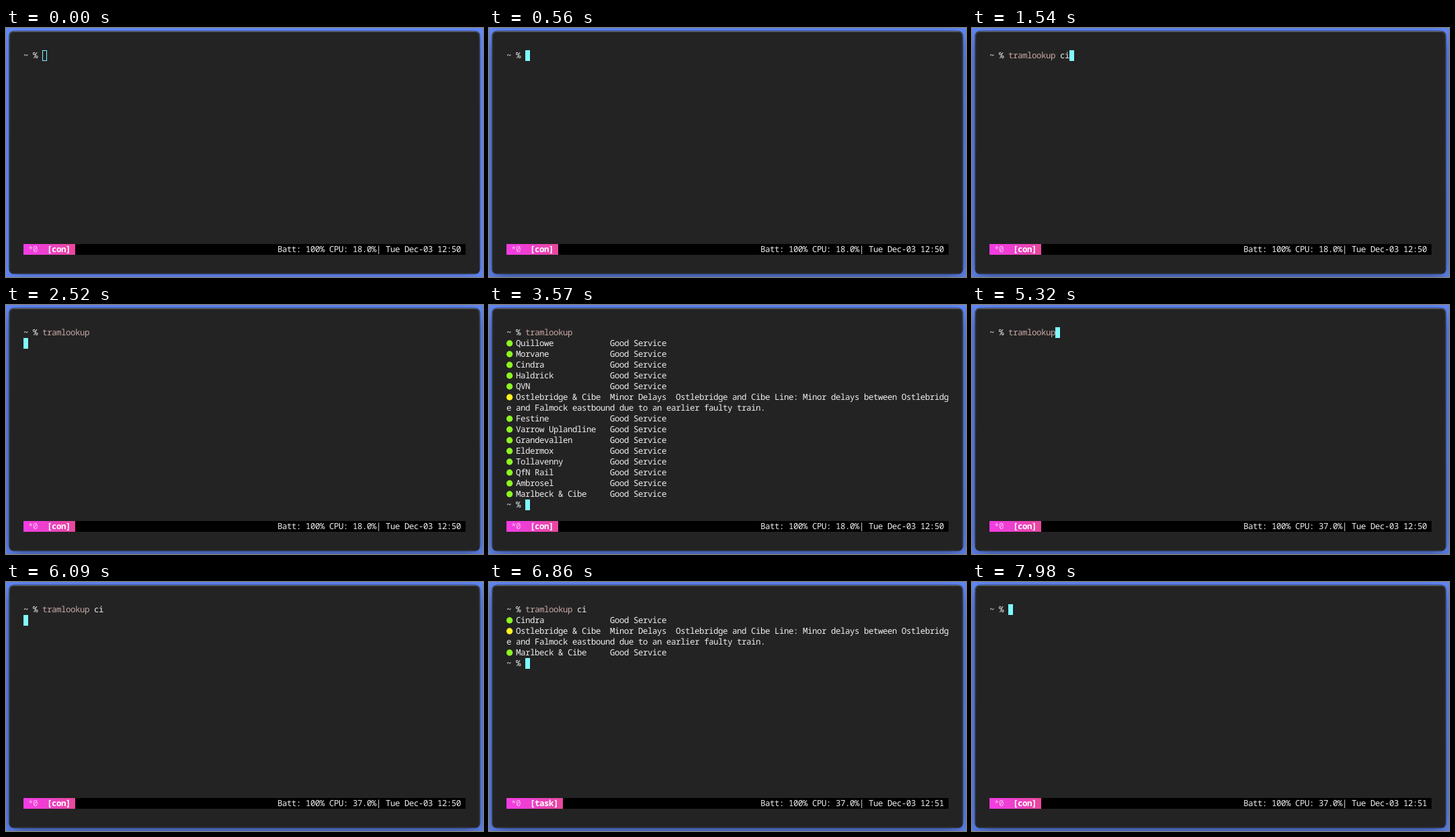
Recreate the animation shown at these times as an HTML page. Size 710x370 px, loop 8 s.

```html
<!DOCTYPE html>
<html lang="en">
<head>
<meta charset="utf-8">
<title>Terminal</title>
<style>
  html, body { margin: 0; width: 100%; height: 100%; overflow: hidden; background: #648bfb; }
  svg { display: block; }
  text {
    font-family: "Noto Sans Mono", "DejaVu Sans Mono", monospace;
    font-size: 12.5px;
    letter-spacing: -0.5px;
    white-space: pre;
    text-rendering: geometricPrecision;
  }
</style>
</head>
<body>
<svg width="710" height="370" viewBox="0 0 710 370">
  <defs>
    <filter id="blur" x="-20%" y="-20%" width="140%" height="140%">
      <feGaussianBlur stdDeviation="14"/>
    </filter>
    <linearGradient id="pink">
      <stop offset="0" stop-color="#f43ce4"/>
      <stop offset="0.4" stop-color="#ee3fd0"/>
      <stop offset="1" stop-color="#e8489c"/>
    </linearGradient>
    <linearGradient id="edge" x2="0" y2="1">
      <stop offset="0" stop-color="#6a6a6a"/>
      <stop offset="0.03" stop-color="#3c3c3c"/>
      <stop offset="1" stop-color="#333"/>
    </linearGradient>
  </defs>
  <rect width="710" height="370" fill="#648bfb"/>
  <rect id="shadow" x="5" y="13" width="700" height="360" rx="6" filter="url(#blur)"/>
  <rect x="4.5" y="4.5" width="701" height="361" rx="7" fill="#10131c"/>
  <rect x="5.5" y="5.5" width="699" height="359" rx="6" fill="#232323" stroke="url(#edge)"/>
  <g id="screen"></g>
</svg>
<script>
const LOOP = 8000, LEFT = 26, TOP = 33, CW = 7, LH = 16, COLS = 94, BAR = 18;
const WHITE = '#efefef', ROSE = '#c9a9a7', CYAN = '#80fbff', GREEN = '#8cf622', YELLOW = '#fff222';
const CMD = 'tramlookup', OK = 'Good Service';

const LINES = [
  'Quillowe', 'Morvane', 'Cindra', 'Haldrick', 'QVN', 'Ostlebridge & Cibe',
  'Festine', 'Varrow Uplandline', 'Grandevallen', 'Eldermox', 'Tollavenny',
  'QfN Rail', 'Ambrosel', 'Marlbeck & Cibe'
].map(name => ({ name, status: OK, note: '' }));
Object.assign(LINES[5], {
  status: 'Minor Delays',
  note: 'Ostlebridge and Cibe Line: Minor delays between Ostlebridge' +
        ' and Falmock eastbound due to an earlier faulty train.'
});

// Timelines: [start time, value]
const INPUT = [
  [0, ''], [1050, CMD + ' ci'], [1890, CMD], [3710, ''], [4410, CMD],
  [5460, CMD + ' '], [5530, CMD + ' c'], [5600, CMD + ' ci'], [7280, '']
];
const PHASE = [
  [0, 'edit'], [2380, 'wait'], [3080, 'done'], [3710, 'edit'],
  [5740, 'wait'], [6440, 'done'], [7280, 'edit']
];
const TASK = [[0, 'con'], [2940, 'task'], [3570, 'con'], [6300, 'task'], [7140, 'con']];
const CPU = [[0, '18.0'], [4900, '37.0']];
const CLOCK = [[0, '12:50'], [6300, '12:51']];

const at = (list, t) => list.filter(e => t >= e[0]).pop()[1];
const screen = document.getElementById('screen');
const shadow = document.getElementById('shadow');
const px = col => LEFT + col * CW;
const py = row => TOP + row * LH;

function add(tag, attrs) {
  const el = document.createElementNS('http://www.w3.org/2000/svg', tag);
  for (const k in attrs) el.setAttribute(k, attrs[k]);
  return screen.appendChild(el);
}

function write(row, col, str, fill = WHITE, weight = 400) {
  add('text', { x: px(col), y: py(row) + 12, fill, 'font-weight': weight }).textContent = str;
}

function cursor(row, col, solid) {
  const x = px(col), y = py(row);
  if (solid) add('rect', { x, y, width: CW, height: LH, fill: CYAN });
  else add('rect', { x: x + 0.5, y: y + 0.5, width: CW - 1, height: LH - 1, fill: 'none', stroke: CYAN });
}

function prompt(row, input) {
  write(row, 0, '~ %');
  write(row, 4, input.slice(0, CMD.length), ROSE);
  write(row, 4 + CMD.length, input.slice(CMD.length));
}

// Prints the matching lines and returns the next free row
function report(row, filter) {
  for (const line of LINES) {
    if (!line.name.toLowerCase().includes(filter)) continue;
    add('ellipse', { cx: LEFT + 4.6, cy: py(row) + 8, rx: 4.7, ry: 4.7, fill: line.note ? YELLOW : GREEN });
    write(row, 2, line.name);
    write(row, 22, line.status);
    if (line.note) {
      const room = COLS - 36;
      write(row++, 36, line.note.slice(0, room));
      write(row, 0, line.note.slice(room));
    }
    row++;
  }
  return row;
}

function statusBar(task, cpu, clock) {
  const y = py(BAR), tab = (8 + task.length) * CW;
  add('rect', { x: LEFT, y, width: COLS * CW, height: LH, fill: '#000' });
  add('rect', { x: LEFT, y, width: tab, height: LH, fill: 'url(#pink)' });
  write(BAR, 1, '*0', '#f5bdeb');
  write(BAR, 5, `[${task}]`, '#fff', 700);
  write(BAR, 54, `Batt: 100% CPU: ${cpu}%| Tue Dec-03 ${clock}`);
}

let last = '';
function draw(t) {
  shadow.setAttribute('opacity', 0.2 + 0.25 * Math.min(1, t / 350));
  const input = at(INPUT, t), phase = at(PHASE, t), focus = t >= 70;
  const bar = [TASK, CPU, CLOCK].map(list => at(list, t));
  const key = [input, phase, focus, ...bar].join();
  if (key === last) return;
  last = key;
  screen.replaceChildren();
  prompt(0, input);
  if (phase === 'edit') cursor(0, 4 + input.length, focus);
  if (phase === 'wait') cursor(1, 0, true);
  if (phase === 'done') {
    const row = report(1, input.slice(CMD.length + 1));
    prompt(row, '');
    cursor(row, 4, true);
  }
  statusBar(...bar);
}

const start = performance.now();
function tick() {
  draw((performance.now() - start) % LOOP);
  requestAnimationFrame(tick);
}
tick();
</script>
</body>
</html>
```
